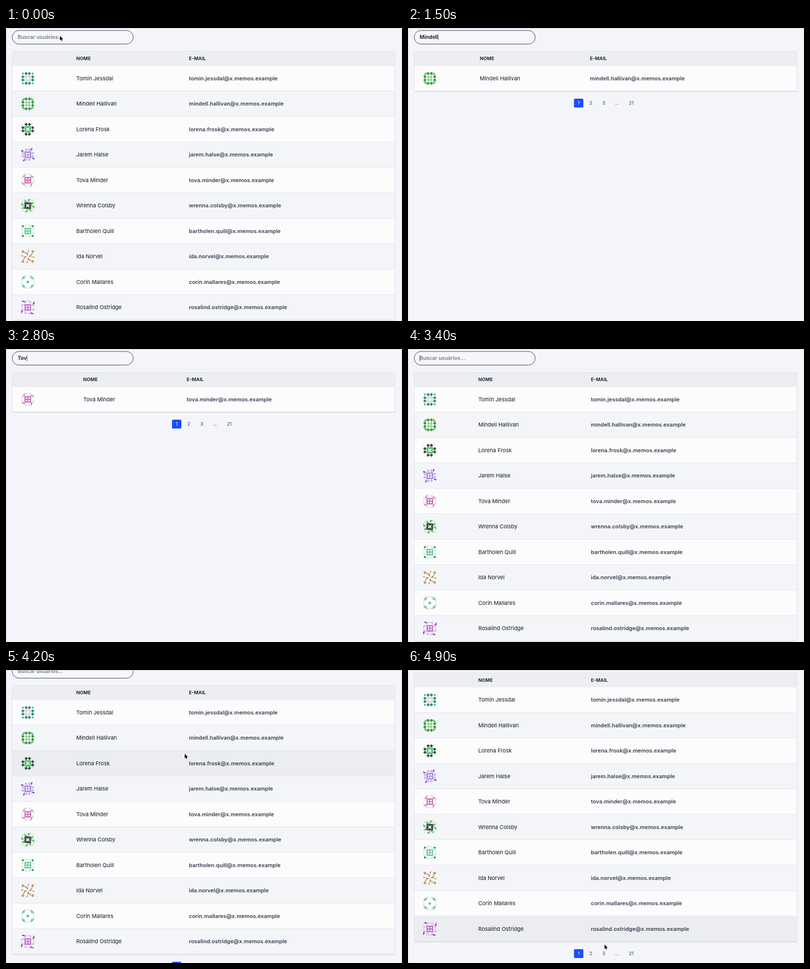
An HTML page that plays this animation: 800x593 px, repeating every 5 s.

```html
<!DOCTYPE html>
<html lang="pt">
<head>
<meta charset="utf-8">
<style>
html, body { margin: 0; width: 100%; height: 100%; overflow: hidden; background: #fff; }
svg { display: block; width: 100vw; height: 100vh; font-family: Inter, "Open Sans", sans-serif; }
.head { font-size: 9.5px; font-weight: 700; fill: #1f2937; }
.name { font-size: 11px; fill: #111827; }
.mail { font-size: 11px; font-weight: 600; fill: #374151; }
.page { font-size: 9.5px; fill: #374151; text-anchor: middle; }
#query { font-size: 10.5px; font-weight: 600; }
</style>
</head>
<body>
<svg id="stage" viewBox="0 0 800 593">
  <g id="doc">
    <rect width="800" height="634.5" fill="#f4f5fa"/>
    <rect x="12.5" y="5" width="244.5" height="27.5" rx="13.75" fill="#f6f7fb" stroke="#3a404c"/>
    <text id="query" x="23.5" y="22.3"></text>
    <path id="caret" d="M0 12.5v12.5" stroke="#4b5563"/>
    <rect id="shade" x="12.5" y="48.5" width="773.5" rx="2" fill="#d5d7dd"/>
    <rect x="13" y="48" width="772.5" height="28.5" fill="#eceef2"/>
    <text class="head nameCol" y="65.4">NOME</text>
    <text class="head mailCol" y="65.4">E-MAIL</text>
    <g id="rows"></g>
    <rect id="frame" x="12.5" y="47.5" width="773" rx="2" fill="none" stroke="#dfe1e6"/>
    <g id="pager">
      <rect x="335.3" y="-9" width="19" height="18" rx="2.5" fill="#194ffa"/>
    </g>
  </g>
  <path d="M0 .5H800" stroke="#d2d4d8"/>
  <path d="M.5 0V593M799.5 0V593" stroke="#dfe0e5"/>
  <path id="mouse" d="M0 0V9L2.1 7 3.5 10.2 5 9.5 3.7 6.5H6.4z" stroke="#fff" stroke-width=".6" paint-order="stroke"/>
</svg>
<script>
const $ = id => document.getElementById(id);
const TOP = 76.5, ROW = 51.5, CELL = 6.6;

const shapes = {
  rhomb: 'M.5 0L1 .5 .5 1 0 .5z',
  tri: 'M0 0V1H1z',
  half: 'M0 .5V1H1z',
  disc: 'M.17 .5a.33 .33 0 1 0 .66 0a.33 .33 0 1 0 -.66 0z',
  ring: 'M0 0H1V.5L.5 1H0z',
  dot: 'M.25 .25H.9V.9H.25z',
  window: 'M0 0H1V1H0zM.35 .35V.86H.86V.35z',
  holes: 'M0 0H1V1H0zM.625 .25L.25 .625 .625 1 1 .625z',
  star: 'M0 0H1V.7L.4 .4 .7 1H0z',
  gem: 'M1 .5V1H.5z',
  spin: 'M.5 0H1V.8z'
};
const spots = [
  [[1, 0], [2, 0], [2, 3], [1, 3], [0, 1], [3, 1], [3, 2], [0, 2]],
  [[0, 0], [3, 0], [3, 3], [0, 3]],
  [[1, 1], [2, 1], [2, 2], [1, 2]]
];

// name, then shape, colour and quarter turns for sides, corners and centre
const users = [
  ['Tomin Jessdal', 'rhomb #2a8977', 'disc #58bfaa', 'ring #dcdddd'],
  ['Mindell Hallivan', 'rhomb #2f9638', 'tri #62ca66 3', 'dot #86cf89'],
  ['Lorena Frosk', 'rhomb #414342', 'half #c9e9d0', 'star #50c46c'],
  ['Jarem Halse', 'rhomb #cbb7ec', 'half #6539ae', 'holes #a47ddf'],
  ['Tova Minder', 'tri #e3e2e5 1', 'half #c968ae 3', 'window #c968ae'],
  ['Wrenna Colsby', 'tri #5ec667', 'rhomb #d9eed8', 'star #414342'],
  ['Bartholen Quill', 'tri #dce9e1 1', 'disc #309a61', 'window #62c993'],
  ['Ida Norvel', 'half #cda166', 'rhomb #c69a60', 'spin #8f6a3c'],
  ['Corin Mallares', 'tri #e2e4e4 1', 'tri #63c795 3', 'gem #58c48c'],
  ['Rosalind Ostridge', 'tri #dfbbe5 1', 'half #464248 2', 'window #c063ca']
];

function icon(parts) {
  return parts.map((part, k) => {
    const [shape, fill, turn = 0] = part.split(' ');
    return spots[k].map(([x, y], i) =>
      `<path d="${shapes[shape]}" fill="${fill}" fill-rule="evenodd" transform="translate(${x} ${y}) rotate(${(i + +turn) * 90} .5 .5)"/>`).join('');
  }).join('');
}

$('rows').innerHTML = users.map(([name, ...parts]) => `<g>
  <rect x="13" width="772.5" height="${ROW}"/>
  <path d="M13 ${ROW - .5}H785.5" stroke="#e3e5ea"/>
  <g transform="translate(${44 - 2 * CELL} ${25.5 - 2 * CELL}) scale(${CELL})">${icon(parts)}</g>
  <text class="name nameCol" y="29.3">${name}</text>
  <text class="mail mailCol" y="29.3">${name.toLowerCase().replace(' ', '.')}@x.memos.example</text></g>`).join('');
$('pager').innerHTML += [['1', 345], ['2', 369.5], ['3', 395.5], ['...', 422], ['21', 451]].map(([s, x], i) =>
  `<text class="page" x="${x}" y="3.4"${i ? '' : ' style="fill:#fff"'}>${s}</text>`).join('');

const rows = [...$('rows').children];
const typing = [
  [0, ''], [400, 'M'], [600, 'Mi'], [1000, 'Min'], [1300, 'Mind'], [1400, 'Minde'], [1500, 'Mindell'],
  [1700, 'Minde'], [1800, 'Mind'], [1900, 'Min'], [2000, 'Mi'], [2100, 'M'], [2200, ''],
  [2500, 'T'], [2600, 'To'], [2800, 'Tov'], [2900, 'Tova'], [3200, 'Tov'], [3300, 'T'], [3400, '']
];
const scrolls = [[0, 0], [3900, 0], [4000, .5], [4100, .5], [4200, 16], [4300, 40], [4400, 43.5], [4700, 41.8], [4900, 41.5], [5000, 41.5]];

function lerpKeys(keys, t) {
  const i = keys.findIndex(k => k[0] > t);
  const [a, u] = keys[i - 1], [b, v] = keys[i];
  return u + (v - u) * (t - a) / (b - a);
}
function ease(t, a, b) {
  const p = Math.min(1, Math.max(0, (t - a) / (b - a)));
  return (1 - Math.cos(Math.PI * p)) / 2;
}
function mouseAt(t) {
  if (t < 3000) return [109, 16];
  const p = ease(t, 3500, 3900), q = ease(t, 4450, 4850);
  return [109 + 252 * p + 36 * q, 16 + 153.7 * p + 386 * q];
}
function setX(cls, x) {
  document.querySelectorAll(cls).forEach(e => e.setAttribute('x', x));
}

function draw(t) {
  const text = typing.filter(k => k[0] <= t).pop()[1];
  const scroll = lerpKeys(scrolls, t);
  const shown = rows.filter((r, i) => users[i][0].toLowerCase().includes(text.toLowerCase()));
  const busy = t >= 300 && t < 3500;
  const hover = busy ? -1 : Math.floor((mouseAt(t - 100)[1] + scroll - TOP) / ROW);

  $('doc').setAttribute('transform', `translate(0 ${-scroll})`);
  $('query').textContent = text || 'Buscar usuários...';
  $('query').style.fill = text ? '#111' : '#777b84';
  const end = text ? $('query').getComputedTextLength() + .5 : .5;
  $('caret').setAttribute('transform', `translate(${23.5 + end} 0)`);
  $('caret').style.display = busy ? '' : 'none';

  rows.forEach(r => r.style.display = 'none');
  shown.forEach((r, i) => {
    r.style.display = '';
    r.setAttribute('transform', `translate(0 ${TOP + i * ROW})`);
    r.firstElementChild.setAttribute('fill', i === hover ? '#ebedf1' : i % 2 ? '#f4f5f9' : '#fcfcfd');
  });
  // columns shift as the longest entries drop out
  const [nameX, mailX] = shown.includes(rows[9]) ? [142, 369.5] : shown.includes(rows[1]) ? [145, 367.5] : [156, 365];
  setX('.nameCol', nameX);
  setX('.mailCol', mailX);

  const height = TOP - 47.5 + ROW * shown.length;
  $('frame').setAttribute('height', height - .5);
  $('shade').setAttribute('height', height);
  $('pager').setAttribute('transform', `translate(0 ${47.5 + height + 24})`);

  $('mouse').style.display = busy ? 'none' : '';
  $('mouse').setAttribute('transform', `translate(${mouseAt(t)})`);
}

function tick() {
  draw(Math.floor(performance.now() % 5000 / 100) * 100);
  requestAnimationFrame(tick);
}
tick();
</script>
</body>
</html>
```
